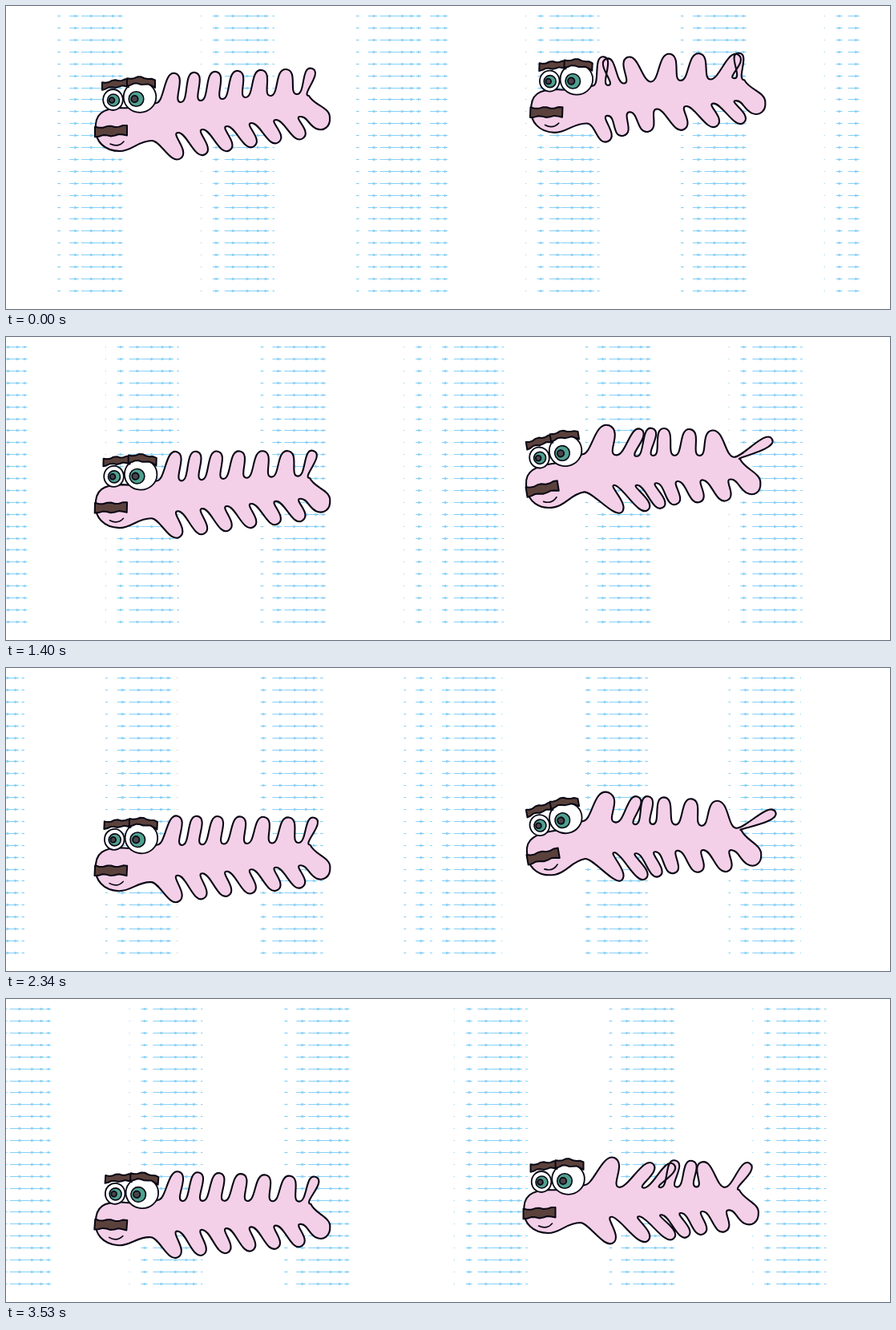
Recreate the animation shown at these times as an HTML page with a canvas. Size 1103x378 px, loop 3.63 s.

```html
<!DOCTYPE html>
<html>
<head>
<meta charset="utf-8">
<style>
html, body { margin: 0; width: 100%; height: 100%; overflow: hidden; background: #fff; }
canvas { display: block; }
</style>
</head>
<body>
<canvas id="stage" width="1103" height="378"></canvas>
<script>
const ctx = document.getElementById('stage').getContext('2d');
const INK = '#080614', LOOP = 3630, STEP = 118, LAST = 30;
const WAVE = 186.3, GRID = 14.9, PIVOT = [170, 152];

const mix = (a, b, u) => a + (b - a) * u;
const clamp = v => Math.max(0, Math.min(1, v));
const rad = deg => deg * Math.PI / 180;
const row = (n, rule) => Array.from({ length: n }, (_, i) => rule(i));
const shift = ([x, y], d) => [x + d, y];

// Resting fins and the valleys between them, counted from head to tail
const TOP_TIPS = row(7, i => [211 + 24 * i + 0.75 * i * i, 84 - i]);
const TOP_VALLEYS = row(6, i => [218 + 24 * i + i * i, 120 - 2 * i]);
const LOW_TIPS = row(6, i => [218 + 30.5 * i, 190 - 5 * i]);
const LOW_VALLEYS = row(6, i => [215 + 30.5 * i, 158 - 4 * i]);

// A wave of strokes runs along the body, in step with the flow
function strokes(flow) {
  const phase = flow / WAVE * 360;
  const wave = (peak, size) => size * Math.cos(rad(phase - peak));
  return {
    x: 709 + wave(215, 4.5),
    tilt: 0.5 + wave(120, 11),
    tail: 2 + wave(285, 10),
    top: row(7, i => wave(20 + 8 * i * i, 21 + 17 * Math.cos(1.4 * (i - 1.6)))),
    low: row(6, i => wave(40 * i - 30, 16 + 8 * Math.cos(i - 1.8)))
  };
}

function arrow(x, y, len) {
  const head = Math.min(5.5, len * 0.6), half = Math.min(1.8, len * 0.25);
  ctx.fillRect(x, y, len, 1);
  ctx.beginPath();
  ctx.moveTo(x + len, y + 0.5);
  ctx.lineTo(x + len - head, y + 0.5 - half);
  ctx.lineTo(x + len - head, y + 0.5 + half);
  ctx.fill();
}

function flowField(left, crest) {
  ctx.fillStyle = '#87d0f6';
  for (let col = 0; col < 36; col++) {
    const x = left + col * GRID;
    const len = 17.5 * Math.cos((x - crest) * 2 * Math.PI / WAVE);
    if (len < -1) continue;
    for (let r = 0; r < 24; r++) arrow(x, Math.floor(12.6 + r * GRID), Math.max(1, len));
  }
}

function outline(pose) {
  const body = rad(pose.turn), head = rad(pose.tilt);
  const place = ([x, y]) => {
    const a = mix(body, head, clamp((235 - x) / 50));
    const dx = x - PIVOT[0], dy = y - PIVOT[1];
    const bend = pose.tail * Math.max(0, dx / 235) ** 2;
    return [pose.x + dx * Math.cos(a) - dy * Math.sin(a),
            pose.y + dx * Math.sin(a) + dy * Math.cos(a) + bend];
  };
  const curve = (a, b, c) => ctx.bezierCurveTo(...place(a), ...place(b), ...place(c));

  // Tips swing in an arc; valleys follow at half the mean of their neighbours
  const swing = (tips, by, sign) => tips.map(([x, y], i) => [x + by[i], y + sign * by[i] ** 2 / 250]);
  const follow = (valleys, by) =>
    valleys.map((v, i) => i + 1 < by.length ? shift(v, (by[i] + by[i + 1]) / 4) : v);

  // Fin with a round cap set square to its own axis
  const fin = (from, tip, to, bow) => {
    const ax = tip[0] - (from[0] + to[0]) / 2, ay = tip[1] - (from[1] + to[1]) / 2;
    const k = 15 / Math.hypot(ax, ay), cx = -ay * k, cy = ax * k;
    curve(shift(from, bow), [tip[0] - cx, tip[1] - cy], tip);
    curve([tip[0] + cx, tip[1] + cy], shift(to, -bow), to);
  };
  const fins = (ends, tips, bow) => tips.forEach((tip, i) => fin(ends[i], tip, ends[i + 1], bow));

  const neck = [187, 121], rump = [378, 112], belly = [182, 168];
  ctx.beginPath();
  ctx.moveTo(...place(neck));
  fins([neck, ...follow(TOP_VALLEYS, pose.top), rump], swing(TOP_TIPS, pose.top, 1), 11);
  curve([384, 124], [404, 126], [404, 139]);
  curve([405, 150], [397, 157], [387, 153]);
  curve([377, 148], [376, 138], LOW_VALLEYS[5]);
  fins([belly, ...follow(LOW_VALLEYS, pose.low)].reverse(), swing(LOW_TIPS, pose.low, -1).reverse(), -11);
  curve([165, 168], [157, 181], [142, 181]);
  curve([122, 181], [112, 168], [112, 155]);
  curve([110, 134], [122, 128], [142, 127]);
  curve([160, 128], [180, 125], neck);
  ctx.closePath();
}

function paint(fill, width) {
  ctx.fillStyle = fill;
  ctx.lineWidth = width;
  ctx.fill();
  ctx.stroke();
}

function oval(x, y, rx, ry, fill, width) {
  ctx.beginPath();
  ctx.ellipse(x, y, rx, ry, 0, 0, 2 * Math.PI);
  paint(fill, width);
}

function eye(x, y, rx, ry, ix, iy, r) {
  oval(x, y, rx, ry, '#fff', 1.8);
  oval(ix, iy, r, r, '#4fa08e', 1.6);
  oval(ix - 2, iy, r * 0.45, r * 0.45, '#4a4548', 1.8);
}

// Ragged strip of hair around a line
function hair(x0, y0, x1, y1, thick, arch) {
  const edge = (s, side) => ctx.lineTo(mix(x0, x1, s),
    mix(y0, y1, s) + side * thick / 2 - arch * Math.sin(Math.PI * s) + Math.sin(13 * s + side));
  ctx.beginPath();
  for (let i = 0; i <= 8; i++) edge(i / 8, -1);
  for (let i = 8; i >= 0; i--) edge(i / 8, 1);
  ctx.closePath();
  paint('#5b413c', 2);
}

function fish(pose) {
  ctx.strokeStyle = INK;
  ctx.lineJoin = ctx.lineCap = 'round';
  outline(pose);
  paint('#f4d0e8', 2.1);

  ctx.save();
  ctx.translate(pose.x, pose.y);
  ctx.rotate(rad(pose.tilt));
  ctx.translate(-PIVOT[0], -PIVOT[1]);
  eye(133.5, 117, 12.3, 13, 134, 117.5, 7.5);
  eye(167, 113.5, 20.3, 19.3, 162.5, 116, 9.3);
  hair(120, 100, 153, 96, 8, 1);
  hair(151, 95, 186, 97, 8, 3);
  hair(111, 157, 151, 155, 11, 0);
  ctx.beginPath();
  ctx.moveTo(130, 172);
  ctx.quadraticCurveTo(140, 177, 147, 169);
  ctx.lineWidth = 1.6;
  ctx.stroke();
  ctx.restore();
}

function draw(now) {
  const step = Math.min(LAST, Math.floor((now % LOOP + 22) / STEP));
  const u = step / LAST;
  const s1 = Math.sin(Math.PI * u), s2 = Math.sin(2 * Math.PI * u);
  const flow = 104 + 655.4 * u - 7 * s1 - 3.5 * s2;
  const turn = 4.2 * u;

  ctx.fillStyle = '#fff';
  ctx.fillRect(0, 0, 1103, 378);
  ctx.save();
  ctx.beginPath();
  ctx.rect(0, 0, 1065, 378);
  ctx.clip();
  flowField(-10.3, flow);
  flowField(529, flow + 592);
  ctx.restore();

  fish({ x: 170, y: 152 + 128.4 * u + 10 * s1 - 5 * s2, turn, tilt: turn, tail: 0,
         top: row(7, () => 0), low: row(6, () => 0) });
  fish({ ...strokes(flow), y: 130 + 133 * u - 6.5 * s2, turn });
}

const start = performance.now();
function loop() {
  draw(performance.now() - start);
  requestAnimationFrame(loop);
}
loop();
</script>
</body>
</html>
```
